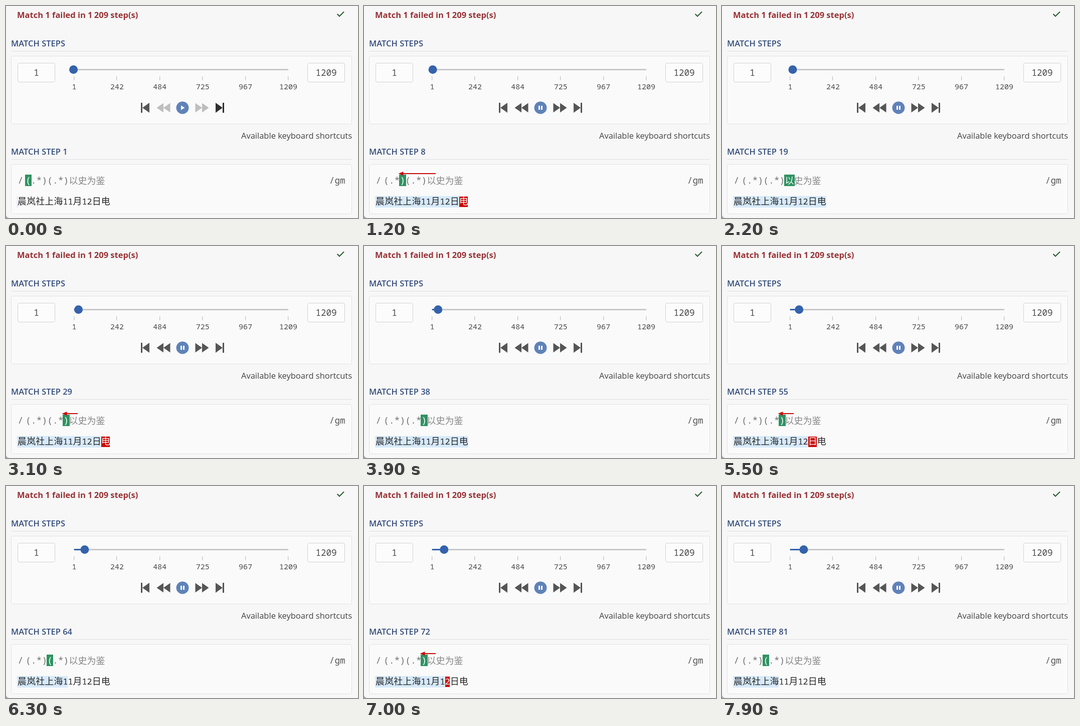
An HTML page with a canvas for the animation above (8 s loop, 702 by 425 pixels).

```html
<!DOCTYPE html>
<html lang="en">
<head>
<meta charset="utf-8">
<title>Match steps</title>
<style>
html, body { margin: 0; width: 100%; height: 100%; overflow: hidden; background: #f7f7f7; }
canvas { display: block; width: 702px; height: 425px; }
</style>
</head>
<body>
<canvas id="stage" width="702" height="425"></canvas>
<script>
const ctx = document.getElementById('stage').getContext('2d');
const LOOP = 8000, TICK = 100, TOTAL = 1209;
const SANS = '"Open Sans", sans-serif';
const MONO = '"Noto Sans Mono", monospace';
const CJK = '"Noto Sans CJK SC", "Noto Sans CJK", sans-serif';
const PATTERN = [...'(.*)(.*)以史为鉴'];
const SUBJECT = [...'晨岚社上海11月12日电'];

// Pattern pieces as [first character, length]
const TOKENS = [[0, 1], [1, 2], [3, 1], [4, 1], [5, 2], [7, 1], [8, 1]];

const isWide = ch => ch > '\u2fff';

function layout(chars, x, wide, narrow) {
  return chars.map(ch => {
    const w = isWide(ch) ? wide : narrow;
    const cell = { ch, x, w };
    x += w;
    return cell;
  });
}
const patternCells = layout(PATTERN, 39, 18, 10.8);
const subjectCells = layout(SUBJECT, 23, 18.1, 10);

// Greedy matching of both groups with backtracking
function buildSteps() {
  const end = SUBJECT.length, list = [];
  const push = (token, pos, back = false) => list.push({ token, pos, back });
  push(0, 0);
  push(1, end);
  push(2, end);
  for (let a = end; a >= 0; a--) {
    if (a < end) push(2, a, true);
    push(3, a);
    push(4, end);
    push(5, end);
    push(6, end);
    for (let b = end - 1; b >= a; b--) {
      push(5, b, true);
      push(6, b);
    }
  }
  return list;
}
const steps = buildSteps();

function rect(x, y, w, h, color) {
  ctx.fillStyle = color;
  ctx.fillRect(x, y, w, h);
}

function poly(color, ...pts) {
  ctx.fillStyle = color;
  ctx.beginPath();
  for (let i = 0; i < pts.length; i += 2) ctx.lineTo(pts[i], pts[i + 1]);
  ctx.fill();
}

function disc(x, y, r, color) {
  ctx.fillStyle = color;
  ctx.beginPath();
  ctx.arc(x, y, r, 0, Math.PI * 2);
  ctx.fill();
}

function box(x, y, w, h, fill, line) {
  ctx.beginPath();
  ctx.roundRect(x + 0.5, y + 0.5, w - 1, h - 1, 3);
  ctx.fillStyle = fill;
  ctx.fill();
  ctx.strokeStyle = line;
  ctx.lineWidth = 1;
  ctx.stroke();
}

function text(str, x, y, font, color, align = 'left') {
  ctx.font = font;
  ctx.fillStyle = color;
  ctx.textAlign = align;
  ctx.fillText(str, x, y);
}

function heading(str, y) {
  text(str, 10, y, `600 16.5px ${SANS}`, '#354d7c');
  rect(10, y + 9, 680, 1, '#dedede');
}

function grey(from, to, k) {
  const v = Math.round(from + (to - from) * Math.min(1, Math.max(0, k)));
  return `rgb(${v},${v},${v})`;
}

function drawHeader() {
  text('Match 1 failed in 1\u2009209 step(s)', 22, 24, `700 16.5px ${SANS}`, '#983135');
  ctx.strokeStyle = '#28582c';
  ctx.lineWidth = 2;
  ctx.beginPath();
  ctx.moveTo(660.5, 16);
  ctx.lineTo(665, 20.5);
  ctx.lineTo(674, 11.5);
  ctx.stroke();
}

function drawSlider(step) {
  box(10, 100, 680, 137, '#fafafa', '#e3e3e3');
  [[23, 1], [601, TOTAL]].forEach(([x, n]) => {
    box(x, 114, 75, 39, '#fcfcfc', '#d2d2d2');
    text(n, x + 37.5, 140, `17.6px ${MONO}`, '#4a4a4a', 'center');
  });
  const knob = 134.6 + (step - 1) / (TOTAL - 1) * 428;
  rect(135, 126, 428, 3, '#c9c9c9');
  rect(136, 126, Math.max(0, knob - 136), 3, '#3462ac');
  for (let i = 0; i < 6; i++) {
    const x = 135.5 + i * 85.4;
    rect(Math.round(x - 0.5), 141, 1.3, 8, '#c4c4c4');
    text(Math.round(TOTAL * i / 5) || 1, x + 0.5, 167, `15px ${MONO}`, '#4a4a4a', 'center');
  }
  disc(knob, 127.5, 8.5, '#3462ac');
}

function drawControls(t) {
  const playing = t >= 300;
  const dark = '#555';
  const seek = grey(190, 85, (t - 200) / 300);
  const last = t < 100 ? '#303030' : dark;
  rect(269, 194, 3, 20, dark);
  poly(dark, 286, 194, 286, 214, 272, 204);
  for (const x of [0, 13.5]) {
    poly(seek, 314 + x, 194.5, 314 + x, 213.5, 300.5 + x, 204);
    poly(seek, 377.5 + x, 194.5, 377.5 + x, 213.5, 391 + x, 204);
  }
  poly(last, 418, 194, 418, 214, 432, 204);
  rect(432, 194, 3, 20, last);
  disc(352, 204, 12.5, '#5f82b8');
  if (playing) {
    rect(348, 200, 3, 8, '#fff');
    rect(353, 200, 3, 8, '#fff');
  } else {
    poly('#fff', 349, 199.5, 349, 208.5, 356.5, 204);
  }
}

function drawCells(cells, size, y, paint) {
  cells.forEach((c, i) => {
    const wide = isWide(c.ch);
    const font = wide ? `300 18px ${CJK}` : `${size}px ${MONO}`;
    text(c.ch, c.x + c.w / 2, y + (wide ? 0.7 : 0), font, paint(i, wide), 'center');
  });
}

function drawPattern({ token, back }) {
  const [first, len] = TOKENS[token];
  const a = patternCells[first], b = patternCells[first + len - 1];
  const left = Math.round(a.x - 1.2);
  rect(left, 338, Math.round(b.x + b.w + 1.4) - left, 23, '#2f9362');
  text('/', 29, 356, `18px ${MONO}`, '#6a6a6a', 'center');
  drawCells(patternCells, 18, 356, (i, wide) =>
    i >= first && i < first + len ? '#fff' : wide ? '#858585' : '#707070');
  text('/gm', 676.5, 356, `17.6px ${MONO}`, '#555', 'right');
  if (back) {
    const tip = left - 1.5;
    rect(tip + 8, 335, 143 - tip - 8, 2, '#c80a0a');
    poly('#c80a0a', tip, 336, tip + 10, 332, tip + 10, 340);
  }
}

function drawSubject({ pos, back }) {
  const next = subjectCells[pos];
  const last = subjectCells[pos - 1];
  if (last) rect(22, 381, last.x + last.w - 22, 23, '#d7eafc');
  else rect(22, 381, 1, 23, '#bcd8f0');
  if (back) rect(Math.round(next.x), 382, Math.round(next.w - 0.8), 21, '#cc0505');
  drawCells(subjectCells, 16.8, 397.5, i => back && i === pos ? '#fff' : '#262626');
}

function draw(t) {
  const step = t < 600 ? 1 : Math.floor(2 + (t - 600) * 0.010945);
  const state = steps[step - 1];
  rect(0, 0, 702, 425, '#a9a9a9');
  ctx.fillStyle = '#f7f7f7';
  ctx.beginPath();
  ctx.roundRect(0, 0, 702, 425, [0, 0, 0, 7]);
  ctx.fill();
  drawHeader();
  heading('MATCH STEPS', 81);
  drawSlider(step);
  drawControls(t);
  text('Available keyboard shortcuts', 690, 265.5, `16.5px ${SANS}`, '#444', 'right');
  heading('MATCH STEP ' + step, 298);
  box(10, 317, 680, 100, '#fafafa', '#e3e3e3');
  drawPattern(state);
  drawSubject(state);
}

function frame() {
  draw(Math.floor(performance.now() % LOOP / TICK) * TICK);
  requestAnimationFrame(frame);
}
frame();
</script>
</body>
</html>
```
